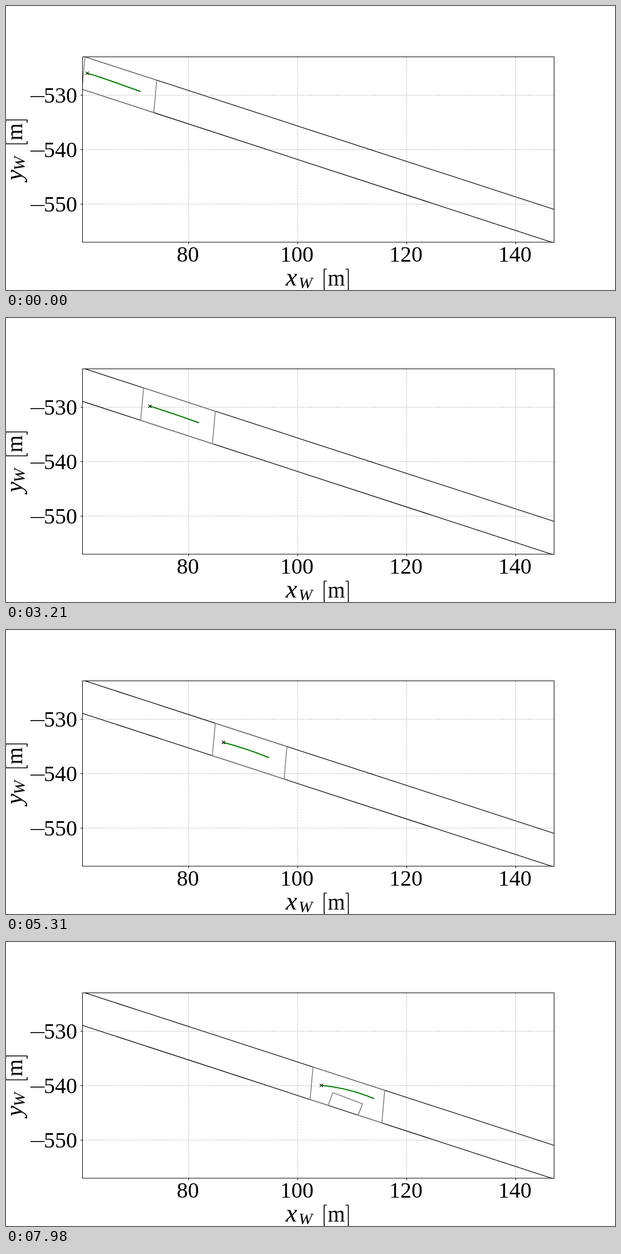
An HTML page that plays this animation: 1095 px wide and 511 px high, repeating every 8 s.

```html
<!DOCTYPE html>
<html lang="en">
<head>
<meta charset="utf-8">
<title>Corridor planning</title>
<style>
  html, body { margin: 0; width: 100%; height: 100%; overflow: hidden; background: #fff; }
  svg { display: block; width: 1095px; height: 511px; }
  text { font: 40px "Liberation Serif", "Times New Roman", serif; }
  .it { font-style: italic; }
  .sub { font-size: 30px; }
  path, rect { fill: none; stroke: #000; }
  .grid { stroke: #b0b0b0; stroke-opacity: .75; stroke-dasharray: 3.5 1.5; }
  .glyph { stroke-width: 1.7; }
  .road { stroke-width: 1.25; }
  #corridor { stroke: #808080; stroke-width: 1.6; stroke-linejoin: round; }
  #plan { stroke: #008000; stroke-width: 2.2; stroke-linecap: square; }
  #car { stroke-width: 1.2; }
</style>
</head>
<body>
<svg viewBox="0 0 1095 511">
  <defs><clipPath id="area"><rect x="137" y="91" width="849" height="334.5"/></clipPath></defs>
  <g id="axes"></g>
  <g clip-path="url(#area)">
    <path class="road" id="roadTop"/>
    <path class="road" id="roadBottom"/>
    <path id="corridor"/>
    <path id="plan"/>
    <path id="car"/>
  </g>
  <rect x="137.5" y="91.5" width="848" height="333.5"/>
  <g id="xLabel">
    <text class="it" x="503" y="503" style="font-size:46px">x</text>
    <text class="it sub" x="526" y="508">W</text>
    <path class="glyph" d="M577 473.5H572V512H577M610.5 473.5H615.5V512H610.5"/>
    <text x="594" y="503" text-anchor="middle">m</text>
  </g>
  <g id="yLabel" transform="translate(29 315) rotate(-90)">
    <text class="it" x="1" y="0" style="font-size:44px">y</text>
    <text class="it sub" x="19" y="5">W</text>
    <path class="glyph" d="M72 -29.5H67V9H72M105 -29.5H110V9H105"/>
    <text x="88.5" y="0" text-anchor="middle">m</text>
  </g>
</svg>
<script>
const LOOP = 8000, HOLD = 1050, STEP = 30;
const CELL = 11.715;                        // road sample spacing in px
const SPAN = 11;                            // samples per corridor
const OBSTACLE = [[579.3, 293.8], [587.7, 271], [641, 291.2], [633, 311.6]];

// step, car x, car y, plan width, plan height, start slope, end slope
const KEYS = [
  [0, 146, 121, 95, 32.5, .28, .345],
  [27, 173, 130, 94, 32, .28, .35],
  [52, 218.5, 145, 93, 32, .28, .36],
  [94, 299, 172.7, 82, 26.5, .31, .33],
  [121, 350, 188.7, 78, 26, .27, .4],
  [165, 432, 215.7, 83.5, 28, .27, .41],
  [184, 467, 227.5, 86, 28, .28, .36],
  [205, 505.5, 239.8, 103.5, 21.5, .32, -.02],
  [216, 525, 245.8, 100, 22, .23, .15],
  [232, 567, 258, 94, 23.5, .1, .42]
];

const $ = id => document.getElementById(id);
const path = points => "M" + points.map(p => p.map(v => v.toFixed(2)).join(" ")).join("L");
const topAt = x => [x, 91.5 + .3253 * (x - 142)];
const bottomAt = x => [x, 150 + .326 * (x - 137.5)];

function drawAxes() {
  let s = "";
  [80, 100, 120, 140].forEach((label, i) => {
    const x = 328 + i * 196;
    s += `<path class="grid" d="M${x + .5} 425V91.5"/><path d="M${x + .5} 425v3.5"/>
      <text x="${x - 1}" y="460" text-anchor="middle">${label}</text>`;
  });
  [530, 540, 550].forEach((label, i) => {
    const y = 160 + i * 98;
    s += `<path class="grid" d="M137.5 ${y + .5}H985.5"/><path d="M137.5 ${y + .5}h-3.5"/>
      <path class="glyph" d="M44 ${y + 3}H69.5"/>
      <text x="128" y="${y + 14}" text-anchor="end">${label}</text>`;
  });
  $("axes").innerHTML = s;
  $("roadTop").setAttribute("d", path([topAt(130), topAt(990)]));
  $("roadBottom").setAttribute("d", path([bottomAt(130), bottomAt(990)]));
}

function slopeAt(i) {
  const a = KEYS[Math.max(0, i - 1)], b = KEYS[Math.min(KEYS.length - 1, i + 1)];
  return (b[1] - a[1]) / (b[0] - a[0]);
}

// Car position is a smooth spline; the plan shape blends linearly.
function stateAt(n) {
  let i = 0;
  while (i < KEYS.length - 2 && n >= KEYS[i + 1][0]) i++;
  const a = KEYS[i], b = KEYS[i + 1], h = b[0] - a[0], u = (n - a[0]) / h;
  const state = a.map((v, c) => v + (b[c] - v) * u);
  const bend = u * (1 - u) * ((1 - u) * (slopeAt(i) * h - (b[1] - a[1]))
                            - u * (slopeAt(i + 1) * h - (b[1] - a[1])));
  state[1] += bend;
  state[2] += bend * .327;
  return state;
}

function cross(p, q, r, s) {
  const dx = q[0] - p[0], dy = q[1] - p[1], ex = s[0] - r[0], ey = s[1] - r[1];
  const det = dx * ey - dy * ex, fx = r[0] - p[0], fy = r[1] - p[1];
  const t = (fx * ey - fy * ex) / det, w = (fx * dy - fy * dx) / det;
  return t >= 0 && t <= 1 && w >= 0 && w <= 1 ? [p[0] + t * dx, p[1] + t * dy] : null;
}

function corridor(x) {
  const u = (x - 142) / 11.72;
  const j = Math.max(0, Math.floor(u - .8)), k = Math.max(0, Math.floor(u - .45));
  const tl = topAt(142 + j * CELL), tr = topAt(142 + (j + SPAN) * CELL);
  const bl = bottomAt(136.7 + k * CELL), br = bottomAt(136.9 + (k + SPAN) * CELL);
  const [a, b, c, d] = OBSTACLE;
  const onTop = cross(tr, br, b, c), onSide = cross(tr, br, a, b);
  let floor = [br];
  if (onTop) floor = [a, b, onTop];
  else if (onSide) floor = [a, onSide];
  else if (br[0] > d[0]) floor = [a, b, c, d, br];
  return path([tl, bl, ...floor, tr]) + "Z";
}

function draw(t) {
  const n = t < HOLD ? 0 : Math.floor((t - HOLD) / STEP) + 1;
  const [, x, y, w, h, s0, s1] = stateAt(n);
  $("corridor").setAttribute("d", corridor(x));
  $("plan").setAttribute("d",
    `M${x} ${y}c${w / 3} ${s0 * w / 3} ${w * 2 / 3} ${h - s1 * w / 3} ${w} ${h}`);
  $("car").setAttribute("d", `M${x - 2.8} ${y - 2.8}l5.6 5.6m0 -5.6l-5.6 5.6`);
}

function tick() {
  draw(performance.now() % LOOP);
  requestAnimationFrame(tick);
}

drawAxes();
tick();
</script>
</body>
</html>
```
